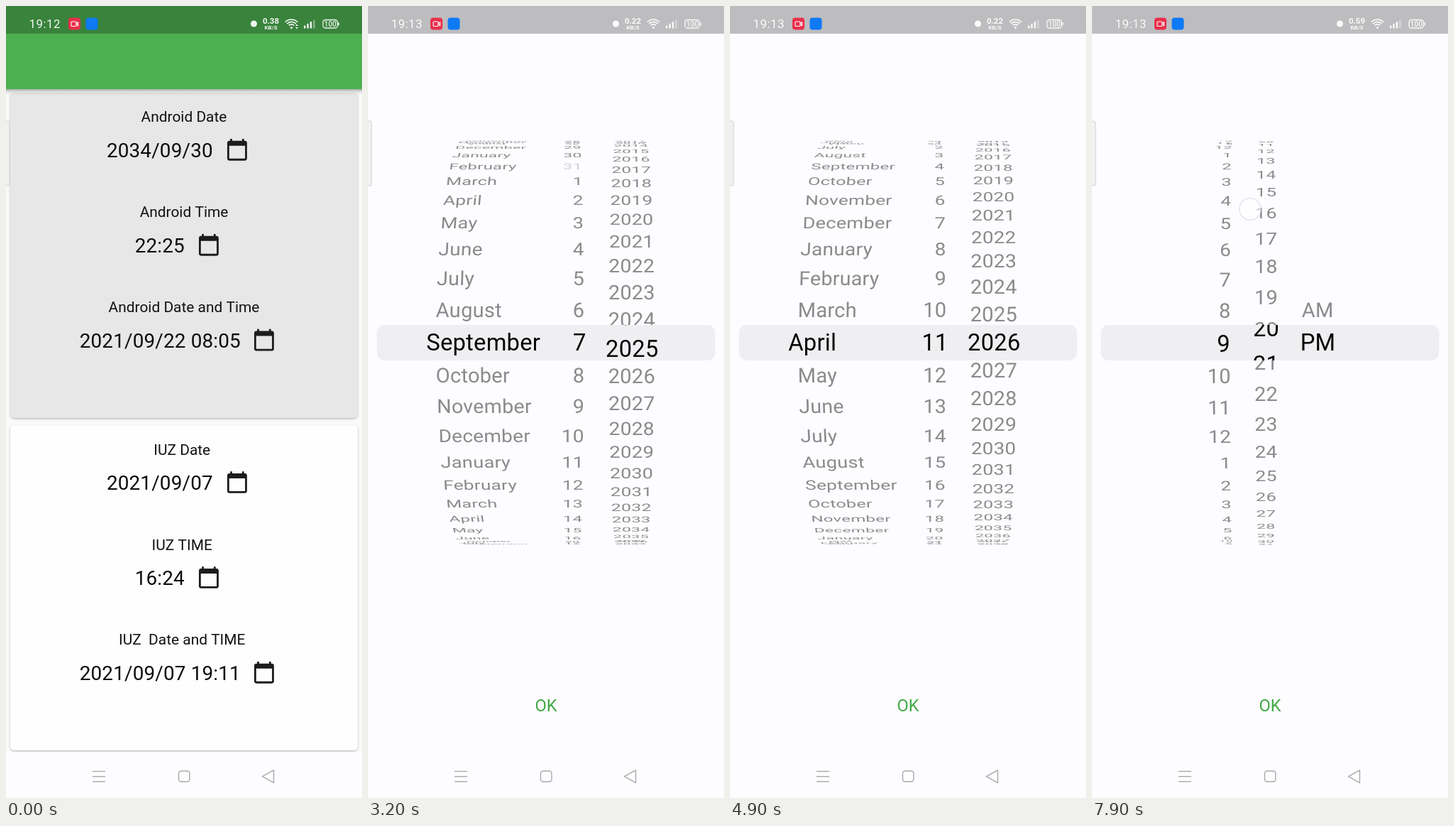
An HTML page with a canvas for the animation above (8000 ms loop, 502 by 1115 pixels).

```html
<!DOCTYPE html>
<html lang="en">
<head>
<meta charset="utf-8">
<title>Date and time pickers</title>
<style>
  html, body { margin: 0; width: 502px; height: 1115px; overflow: hidden; background: #fdfcfe; }
  canvas { display: block; width: 502px; height: 1115px; }
</style>
</head>
<body>
<canvas id="stage"></canvas>
<script>
const W = 502, H = 1115, BODY = 1050, LOOP = 8000, STEP = 100;
const canvas = document.getElementById('stage');
const ctx = canvas.getContext('2d');
const dpr = window.devicePixelRatio || 1;
canvas.width = W * dpr;
canvas.height = H * dpr;

const MONTHS = ['January', 'February', 'March', 'April', 'May', 'June', 'July',
  'August', 'September', 'October', 'November', 'December'];
const mod = (n, m) => ((n % m) + m) % m;
const clamp = v => Math.max(0, Math.min(1, v));
const easeOut = u => 1 - (1 - u) * (1 - u);

// Cubic curve with a fast start and a long tail.
function sheetEase(x) {
  if (x <= 0 || x >= 1) return clamp(x);
  const bez = (s, a, b) => 3 * (1 - s) * (1 - s) * s * a + 3 * (1 - s) * s * s * b + s * s * s;
  let lo = 0, hi = 1;
  for (let i = 0; i < 24; i++) {
    const mid = (lo + hi) / 2;
    if (bez(mid, 0.35, 0.33) < x) lo = mid; else hi = mid;
  }
  return bez(lo, 0.91, 0.97);
}

// Value of a track made of [time, value] stops, easing out between them.
function track(stops, t, ease = easeOut) {
  if (t <= stops[0][0]) return stops[0][1];
  for (let i = 1; i < stops.length; i++) {
    const [t0, a] = stops[i - 1], [t1, b] = stops[i];
    if (t < t1) return a + (b - a) * ease((t - t0) / (t1 - t0));
  }
  return stops[stops.length - 1][1];
}

const TRACKS = {
  year: [[2780, 2021], [3600, 2026]],
  month: [[3860, 8], [4200, 12.07], [4340, 12.07], [4900, 15]],
  day: [[3660, 7], [4000, 11.02], [4380, 11.02], [4480, 11]],
  hour: [[7160, 7], [7650, 8.97]],
  minute: [[7560, 13], [7900, 20.4]]
};
const SLIDE = 335, OPEN_DATE = 1820, CLOSE_DATE = 5465, OPEN_TIME = 6420;

// Finger contacts: start, end, x, y at start, y at end.
const TOUCHES = [
  [1600, 1700, 325, 671, 671],
  [2800, 3100, 411, 600, 462],
  [5300, 5400, 251, 985, 985],
  [6200, 6300, 286, 805, 805],
  [7600, 7900, 223, 586, 286]
];

function font(size, weight = 400) {
  ctx.font = `${weight} ${size}px Roboto, sans-serif`;
}

function text(str, x, y, size, color, align = 'left', weight = 400, spacing = 0) {
  font(size, weight);
  ctx.letterSpacing = spacing + 'px';
  ctx.textAlign = align;
  ctx.fillStyle = color;
  ctx.fillText(str, x, y);
}

function box(x, y, w, h, r, fill, stroke, line = 1) {
  ctx.beginPath();
  ctx.roundRect(x, y, w, h, r);
  if (fill) { ctx.fillStyle = fill; ctx.fill(); }
  if (stroke) { ctx.strokeStyle = stroke; ctx.lineWidth = line; ctx.stroke(); }
}

function disc(x, y, r, fill, stroke) {
  ctx.beginPath();
  ctx.arc(x, y, r, 0, Math.PI * 2);
  if (fill) { ctx.fillStyle = fill; ctx.fill(); }
  if (stroke) { ctx.strokeStyle = stroke; ctx.lineWidth = 1.3; ctx.stroke(); }
}

const CALENDAR = new Path2D('M20 3h-1V1h-2v2H7V1H5v2H4c-1.1 0-2 .9-2 2v16c0 1.1.9 2 2 2h16c1.1 0 2-.9 2-2V5c0-1.1-.9-2-2-2zm0 18H4V8h16v13z');

function field(title, cx, value, x, iconX, y) {
  text(title, cx, y + 7.4, 20.9, '#111', 'center');
  text(value, x, y + 57, 27.9, '#0c0c0c', 'left', 400, 0.15);
  ctx.save();
  ctx.translate(iconX, y + 29.6);
  ctx.scale(1.394, 1.394);
  ctx.fillStyle = '#1c1c1c';
  ctx.fill(CALENDAR);
  ctx.restore();
}

function card(y, h, color) {
  ctx.save();
  ctx.shadowColor = 'rgba(0,0,0,.28)';
  ctx.shadowBlur = 3 * dpr;
  ctx.shadowOffsetY = 1.2 * dpr;
  box(6, y, 490, h, 5.5, color);
  ctx.restore();
}

function group(name, cx, y, values) {
  const [date, time, both] = values;
  field(`${name} Date`, cx, date, 141.9, 309.2, y);
  field(name === 'Android' ? 'Android Time' : `${name} TIME`, cx, time, 181.7, 269.2, y + 134);
  field(name === 'Android' ? 'Android Date and Time' : `${name}  Date and TIME`,
    cx, both, 103.7, 347.2, y + 267.8);
}

function ripple(t, start, x, y) {
  const u = (t - start) / 400;
  if (u < 0 || u >= 1) return;
  disc(x, y, 33 * easeOut(clamp(u * 2 + 0.3)), `rgba(0,0,0,${0.1 * (1 - u * u)})`);
}

function page(t) {
  ctx.fillStyle = '#fafafa';
  ctx.fillRect(0, 0, W, BODY);
  card(122.5, 457.5, '#e7e7e7');
  card(590.5, 457.5, '#fefefe');

  const fade = ctx.createLinearGradient(0, 117, 0, 126);
  fade.addColorStop(0, 'rgba(0,0,0,.3)');
  fade.addColorStop(0.45, 'rgba(0,0,0,.09)');
  fade.addColorStop(1, 'rgba(0,0,0,0)');
  ctx.fillStyle = fade;
  ctx.fillRect(0, 117, W, 9);
  ctx.fillStyle = '#4caf50';
  ctx.fillRect(0, 0, W, 117);

  group('Android', 251, 156, ['2034/09/30', '22:25', '2021/09/22 08:05']);
  const date = t < CLOSE_DATE ? '2021/09/07' : '2026/04/11';
  group('IUZ', 248.2, 624.2, [date, '16:24', '2021/09/07 19:11']);
  ripple(t, 1600, 325.5, 671);
  ripple(t, 6200, 286, 805);
}

// Wheel geometry: a cylinder seen in perspective, magnified in the middle band.
const RADIUS = 507, DEPTH = 1.091, MID = 474, ZOOM = 1.119, BAND = [449, 499];

function wheelRow(col, label, angle, zoom, color) {
  const s = Math.sin(angle), c = Math.cos(angle);
  const w = 1 + DEPTH * (1 - c);
  const x = col.x - col.cx;
  const mid = x + ctx.measureText(label).width / 2 * (col.align === 'right' ? -1 : 1);
  ctx.save();
  ctx.translate(col.cx, MID);
  ctx.scale(zoom, zoom);
  ctx.transform(1 / w, 0, -mid * DEPTH / RADIUS * s / (w * w),
    (w * c - DEPTH * s * s) / (w * w), 0, RADIUS * s / w);
  ctx.fillStyle = color;
  ctx.fillText(label, x, 10);
  ctx.restore();
}

function wheel(col, pos) {
  const step = 0.0909 * 1.25 / (col.squeeze || 1.25);
  const reach = 1.2 / step;
  for (const inBand of [false, true]) {
    ctx.save();
    ctx.beginPath();
    if (inBand) ctx.rect(0, BAND[0], W, BAND[1] - BAND[0]);
    else {
      ctx.rect(0, 0, W, BAND[0]);
      ctx.rect(0, BAND[1], W, BODY - BAND[1]);
    }
    ctx.clip();
    font(29.27);
    ctx.letterSpacing = '0.2px';
    ctx.textAlign = col.align || 'left';
    for (let n = Math.ceil(pos - reach); n <= pos + reach; n++) {
      if (inBand && Math.abs(n - pos) > 2) continue;
      const label = col.label(n);
      if (!label) continue;
      const off = col.off && col.off(label);
      const color = inBand ? (off ? '#aaa' : '#060606') : (off ? '#d0d0d2' : '#8b8a8c');
      wheelRow(col, label, (n - pos) * step, inBand ? ZOOM : 1, color);
    }
    ctx.restore();
  }
}

const COLS = {
  month: { x: 95.2, cx: 204, label: n => MONTHS[mod(n, 12)] },
  day: { x: 305.5, cx: 287, align: 'right', label: n => String(mod(n - 1, 31) + 1) },
  year: { x: 338.6, cx: 368, squeeze: 1.45, label: n => String(n) },
  hour: { x: 195.7, cx: 203, align: 'right', label: n => String(mod(n - 1, 12) + 1) },
  minute: { x: 228.8, cx: 245, label: n => String(mod(n, 60)).padStart(2, '0') },
  half: { x: 295.6, cx: 312, label: n => ['AM', 'PM'][n] }
};

function sheet(t, timeMode, shown) {
  if (shown <= 0) return;
  ctx.fillStyle = `rgba(0,0,0,${0.2 * shown})`;
  ctx.fillRect(0, 0, W, BODY);
  ctx.save();
  ctx.translate(0, Math.round(BODY * (1 - shown)));
  ctx.fillStyle = '#fdfcfe';
  ctx.fillRect(0, 0, W, BODY);
  box(12.5, BAND[0], 477, BAND[1] - BAND[0], 11, '#efeef1');
  if (timeMode) {
    wheel(COLS.hour, track(TRACKS.hour, t));
    wheel(COLS.minute, track(TRACKS.minute, t, u => u));
    wheel(COLS.half, 1);
  } else {
    const month = track(TRACKS.month, t), year = track(TRACKS.year, t);
    const length = new Date(Math.round(year), mod(Math.round(month), 12) + 1, 0).getDate();
    COLS.day.off = label => +label > length;
    wheel(COLS.month, month);
    wheel(COLS.day, track(TRACKS.day, t));
    wheel(COLS.year, year);
  }
  const pressed = t >= 5300 && t < 5600;
  text('OK', 251, 993.2, 23.7, pressed ? 'rgba(65,168,70,.45)' : '#41a846', 'center');
  ctx.restore();
}

function statusBar(t) {
  const ink = 'rgba(255,255,255,.93)';
  ctx.fillStyle = 'rgba(0,0,0,.255)';
  ctx.fillRect(0, 0, W, 39);
  text(t < 3000 ? '19:12' : '19:13', 32.5, 31, 17, ink, 'left', 400, 0.4);

  box(88, 16.5, 17, 17, 4, '#ea2f4b');
  box(92, 22, 7, 6.5, 1, null, '#fff', 1.1);
  ctx.beginPath();
  ctx.moveTo(99, 25); ctx.lineTo(101.6, 22.6); ctx.lineTo(101.6, 28); ctx.closePath();
  ctx.stroke();
  box(112.5, 16.5, 17, 17, 4, '#0f7af5');

  disc(349.5, 25, 4.5, ink);
  const rate = t < 3000 ? '0.38' : t < 7600 ? '0.22' : '0.59';
  text(rate, 373.5, 25, 11.5, ink, 'center', 700);
  text('KB/S', 373.5, 33, 8, ink, 'center', 700);

  ctx.lineWidth = 1.7;
  ctx.strokeStyle = ink;
  for (const r of [5.2, 8.6, 12]) {
    ctx.beginPath();
    ctx.arc(402.5, 31, r, -Math.PI * 0.76, -Math.PI * 0.24);
    ctx.stroke();
  }
  disc(402.5, 30.5, 1.6, ink);
  if (t < 1400) {
    ctx.fillStyle = ink;
    for (const dir of [-1, 1]) {
      ctx.beginPath();
      ctx.moveTo(408, 29 + dir); ctx.lineTo(412, 29 + dir); ctx.lineTo(410, 29 + dir * 3.4);
      ctx.fill();
    }
  }
  for (let i = 0; i < 4; i++) {
    const h = 4 + i * 2.7;
    box(420 + i * 4.4, 31.5 - h, 2.4, h, 0.6, i < 3 ? ink : 'rgba(255,255,255,.4)');
  }
  box(447, 19.5, 20.5, 11.5, 3.5, null, ink, 1.3);
  box(468.5, 23, 1.5, 4.5, 0.7, ink);
  text('100', 457.3, 28.8, 10, ink, 'center', 500);
}

function navBar() {
  const ink = '#a9a8aa';
  ctx.fillStyle = '#fdfcfe';
  ctx.fillRect(0, BODY, W, H - BODY);
  ctx.fillStyle = ink;
  for (const y of [1076.8, 1084, 1091.2]) ctx.fillRect(122, y, 18, 1.4);
  box(243.5, 1077, 15.5, 15, 3.5, null, ink, 1.4);
  ctx.beginPath();
  ctx.moveTo(361.5, 1084.7); ctx.lineTo(377.5, 1075.8); ctx.lineTo(377.5, 1093.6);
  ctx.closePath();
  ctx.lineJoin = 'round';
  ctx.stroke();
}

function touches(t) {
  for (const [start, end, x, y0, y1] of TOUCHES) {
    if (t < start || t > end) continue;
    const y = y0 + (y1 - y0) * (t - start) / (end - start);
    disc(x, y, 15.3, 'rgba(255,255,255,.5)', 'rgba(205,205,225,.6)');
  }
}

function draw(t) {
  ctx.setTransform(dpr, 0, 0, dpr, 0, 0);
  page(t);
  const timeMode = t >= 6000;
  const shown = timeMode
    ? sheetEase((t - OPEN_TIME) / SLIDE)
    : sheetEase((t - OPEN_DATE) / SLIDE) - sheetEase((t - CLOSE_DATE) / SLIDE);
  sheet(t, timeMode, shown);
  statusBar(t);
  navBar();
  box(-4, 162, 9, 91, 2.5, 'rgba(240,240,240,.85)', 'rgba(185,185,185,.6)');
  touches(t);
}

const began = performance.now();
function tick() {
  const t = (performance.now() - began) % LOOP;
  draw(Math.floor(t / STEP) * STEP);
  requestAnimationFrame(tick);
}
tick();
</script>
</body>
</html>
```
